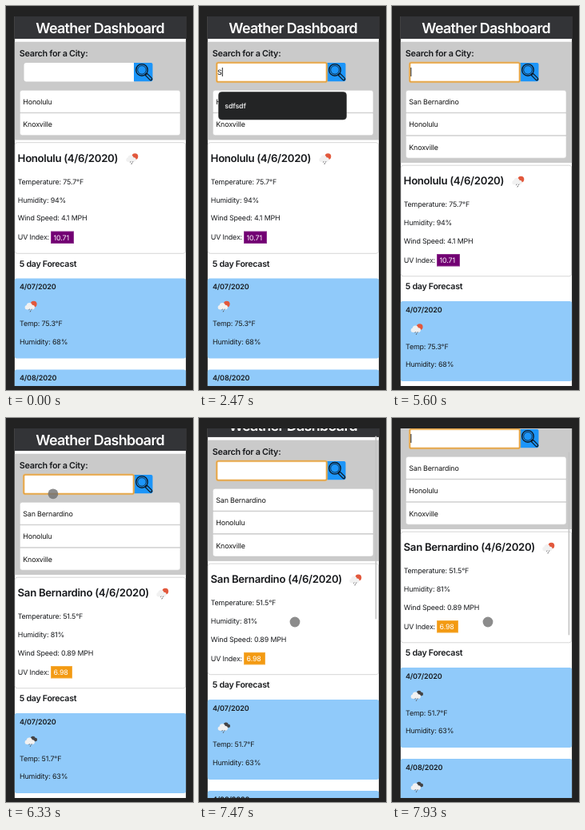
Write an HTML page with a canvas that moves like this. It is 234 px wide and 480 px high and loops after 8000 ms.

```html
<!DOCTYPE html>
<html lang="en">
<head>
<meta charset="utf-8">
<title>Weather Dashboard</title>
<style>
html, body { margin: 0; width: 100%; height: 100%; overflow: hidden; background: #222; }
canvas { display: block; width: 234px; height: 480px; }
</style>
</head>
<body>
<canvas id="stage"></canvas>
<script>
const W = 234, H = 480, LOOP = 8000, STEP = 1000 / 15;
const VIEW = { x: 10.6, y: 13, w: 214.7, h: 462 };
const ROW = 28.5;
const canvas = document.getElementById('stage');
const ctx = canvas.getContext('2d');
const dpr = window.devicePixelRatio || 1;
canvas.width = W * dpr;
canvas.height = H * dpr;

const cities = {
  honolulu: {
    name: 'Honolulu', temp: '75.7', humidity: 94, wind: '4.1',
    uv: '10.71', uvColor: '#720073', uvWidth: 29, iconX: 158
  },
  bernardino: {
    name: 'San Bernardino', temp: '51.5', humidity: 81, wind: '0.89',
    uv: '6.98', uvColor: '#f39a12', uvWidth: 27, iconX: 196
  }
};
const forecasts = {
  honolulu: { temp: '75.3', humidity: 68, dark: false },
  bernardino: { temp: '51.7', humidity: 63, dark: true }
};

// [time, number of letters typed]
const QUERY = 'San Bernardino';
const KEYS = [[2270, 1], [2600, 2], [2730, 3], [3200, 4], [3400, 5], [3800, 6], [4065, 7],
  [4260, 8], [4530, 9], [4665, 10], [4800, 11], [5000, 13], [5265, 14], [5600, 0]];

const FOCUS = 1400, SUBMIT = 5598, WEATHER = 6065, FORECAST = 6130;
const BLINK = 1600 / 3;

const clamp = v => Math.max(0, Math.min(1, v));
const ease = v => v * v * (3 - 2 * v);
const mix = (a, b, k) => a + (b - a) * k;

function text(str, x, y, size = 8.9, weight = 400, color = '#17191c', spacing = -0.017) {
  ctx.font = `${weight} ${size}px Inter, "Liberation Sans", sans-serif`;
  ctx.letterSpacing = spacing * size + 'px';
  ctx.fillStyle = color;
  ctx.fillText(str, x, y);
  return ctx.measureText(str).width;
}

function rect(x, y, w, h, color) {
  ctx.fillStyle = color;
  ctx.fillRect(x, y, w, h);
}

function box(x, y, w, h, r, fill, stroke, line = 1) {
  ctx.beginPath();
  ctx.roundRect(x, y, w, h, r);
  if (fill) { ctx.fillStyle = fill; ctx.fill(); }
  if (stroke) { ctx.strokeStyle = stroke; ctx.lineWidth = line; ctx.stroke(); }
}

function disc(x, y, r, color) {
  ctx.beginPath();
  ctx.arc(x, y, r, 0, Math.PI * 2);
  ctx.fillStyle = color;
  ctx.fill();
}

function segment(x1, y1, x2, y2, width, color) {
  ctx.beginPath();
  ctx.moveTo(x1, y1);
  ctx.lineTo(x2, y2);
  ctx.lineWidth = width;
  ctx.strokeStyle = color;
  ctx.stroke();
}

function cloud(x, y, s, color) {
  disc(x - 3.4 * s, y + 1 * s, 2.4 * s, color);
  disc(x - 0.6 * s, y - 1 * s, 3.3 * s, color);
  disc(x + 3 * s, y + 0.8 * s, 2.6 * s, color);
  rect(x - 3.4 * s, y, 6.4 * s, 3.4 * s, color);
}

function rainIcon(x, y, dark) {
  if (dark) cloud(x + 3, y - 2.2, 0.85, '#444446');
  else disc(x + 3.4, y - 2.4, 3.9, '#e2583c');
  cloud(x - 1.4, y + 0.6, 1.08, '#f1f1f1');
  segment(x - 1.8, y + 3.6, x - 2.6, y + 5.2, 0.9, '#6c6c70');
  segment(x + 1, y + 3.6, x + 0.2, y + 5.2, 0.9, '#6c6c70');
  segment(x - 0.4, y + 5.8, x - 1.1, y + 7.4, 1, '#5a5a5e');
}

function magnifier() {
  const blue = '#1c95f9', ink = '#0d1c2a';
  box(160, 71, 23.5, 23.3, [0, 2, 2, 0], blue);
  ctx.lineCap = 'round';
  segment(175.8, 85.8, 181.2, 91.2, 4.4, ink);
  segment(176.4, 86.4, 181, 91, 1.9, blue);
  ctx.lineCap = 'butt';
  for (const [r, line] of [[7.3, 1.4], [5.3, 0.8]]) {
    ctx.beginPath();
    ctx.arc(170, 79.9, r, 0, Math.PI * 2);
    ctx.lineWidth = line;
    ctx.strokeStyle = ink;
    ctx.stroke();
  }
}

function typed(t) {
  let n = 0, last = FOCUS;
  for (const [at, count] of KEYS) if (t >= at) { n = count; last = at; }
  return { value: QUERY.slice(0, n), last };
}

function searchInput(t) {
  box(22.5, 71, 138, 23.5, [3, 0, 0, 3], '#fff');
  magnifier();
  if (t < FOCUS) return;
  box(22.2, 70.9, 137.6, 24, 2, null, 'rgba(243,186,100,.6)', 2.8);
  box(22.2, 70.9, 137.6, 24, 2, null, '#e5a03a', 1.3);
  const { value, last } = typed(t);
  const width = value ? text(value, 23, 86.3, 8.8, 400, '#111') : 0;
  const lit = Math.floor((t - last + 70) / BLINK) % 2 === 0;
  if (lit) rect(23.3 + width, 77, 1, 11, '#222');
}

function cityList(names) {
  names.forEach((name, i) => {
    const y = 105 + i * ROW;
    const top = i === 0 ? 3 : 1, low = i === names.length - 1 ? 3 : 1;
    box(17.3, y + 0.3, 200.8, ROW - 0.6, [top, top, low, low], '#fff', '#c4c4c4', 0.6);
    text(name, 21.3, y + 17.8, 8.9, 400, '#111');
  });
}

function currentWeather(c) {
  box(11.2, 170.7, 213.4, 138.6, 3, '#fff', '#d2d2d2', 0.9);
  text(`${c.name} (4/6/2020)`, 14.6, 194.7, 13.2, 600, '#17191c', -0.023);
  rainIcon(c.iconX, 190.5, false);
  text(`Temperature: ${c.temp}°F`, 14.7, 222.8);
  text(`Humidity: ${c.humidity}%`, 14.7, 245.6);
  text(`Wind Speed: ${c.wind} MPH`, 14.7, 268.4);
  text('UV Index:', 14.7, 292.4);
  rect(56, 281.5, c.uvWidth, 15.5, c.uvColor);
  box(56.3, 281.8, c.uvWidth - 0.6, 14.9, 0, null, 'rgba(255,255,255,.35)', 0.7);
  text(c.uv, 59.6, 292.5, 8.9, 400, '#fff');
}

function forecastCard(y, date, data) {
  box(10.6, y - 0.4, 214.7, 100, 3, '#90cafa');
  text(date, 17, y + 13.3, 9, 600);
  rainIcon(31.3, y + 34, data.dark);
  text(`Temp: ${data.temp}°F`, 17, y + 59);
  text(`Humidity: ${data.humidity}%`, 17, y + 81.5);
}

function suggestion(t) {
  const alpha = clamp((t - 2300) / 100) * clamp((2730 - t) / 130);
  if (!alpha) return;
  ctx.globalAlpha = alpha;
  box(24.5, 107.5, 160, 34.5, 4, '#232425', '#38393a', 0.6);
  text('sdfsdf', 32.3, 127.8, 8.8, 600, '#e4e4e4');
  ctx.globalAlpha = 1;
}

function pointer(t) {
  let x, y;
  if (t >= 665 && t < 2200) {
    const k = ease(clamp((t - 800) / 330));
    x = mix(186, 54, k);
    y = mix(95, 82, k);
  } else if (t >= 6265) {
    const k = ease(clamp((t - 6200) / 800));
    x = mix(54, 120, k);
    y = mix(82, 255, k);
  } else return;
  disc(x, y, 6.4, 'rgba(112,112,112,.8)');
}

function draw(time) {
  const n = Math.floor((time + 4) / STEP);
  const t = n * STEP;
  const scroll = Math.max(0, n - 109) * ROW / 5;
  const submitted = t >= SUBMIT;
  const shift = submitted ? ROW : 0;

  ctx.setTransform(dpr, 0, 0, dpr, 0, 0);
  ctx.textRendering = 'geometricPrecision';
  rect(0, 0, W, H, '#222');

  ctx.save();
  ctx.beginPath();
  ctx.rect(VIEW.x, VIEW.y, VIEW.w, VIEW.h);
  ctx.clip();
  rect(VIEW.x, VIEW.y, VIEW.w, VIEW.h, '#fff');

  ctx.save();
  ctx.translate(0, -scroll);
  rect(VIEW.x, 13, VIEW.w, 28, '#333437');
  ctx.textAlign = 'center';
  text('Weather Dashboard', 117.6, 33.6, 17.9, 600, '#fff', -0.038);
  ctx.textAlign = 'left';
  rect(VIEW.x, 44.7, VIEW.w, 122.8 + shift, '#cacaca');
  text('Search for a City:', 16.8, 63.4, 10.8, 600, '#17191c', -0.025);
  searchInput(t);
  cityList(submitted ? [QUERY, 'Honolulu', 'Knoxville'] : ['Honolulu', 'Knoxville']);

  ctx.translate(0, shift);
  currentWeather(t >= WEATHER ? cities.bernardino : cities.honolulu);
  text('5 day Forecast', 16.8, 325.8, 10.6, 600, '#17191c', -0.025);
  const next = t >= FORECAST ? forecasts.bernardino : forecasts.honolulu;
  forecastCard(341, '4/07/2020', next);
  forecastCard(455, '4/08/2020', next);
  ctx.restore();

  suggestion(t);
  if (scroll) box(220.6, 14 + scroll / 2, 1.6, 229, 0.8, '#c4c4c4');
  pointer(t);
  ctx.restore();
}

const start = performance.now();
function tick() {
  draw((performance.now() - start) % LOOP);
  requestAnimationFrame(tick);
}
tick();
</script>
</body>
</html>
```
